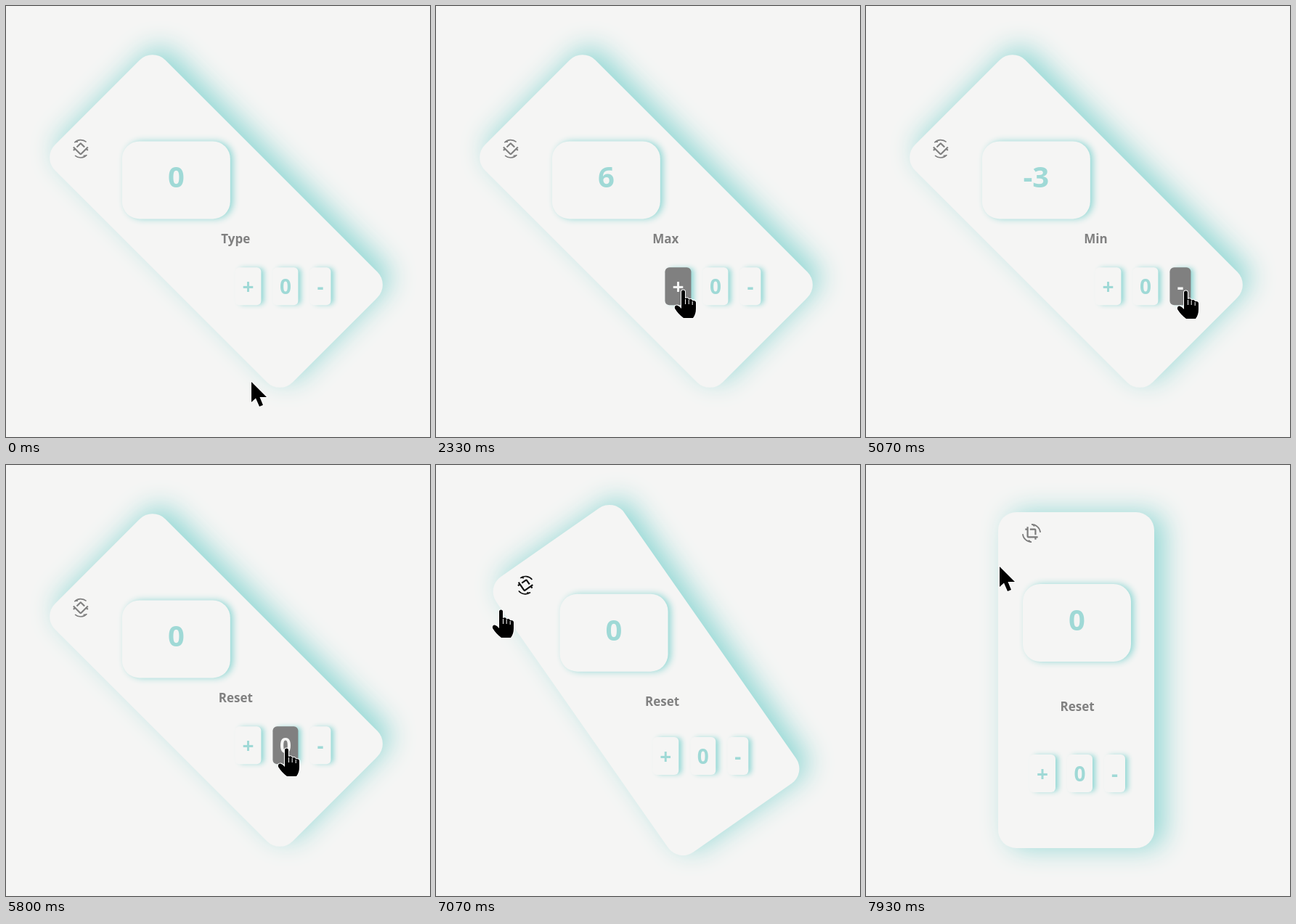
An HTML page for the animation above (8 s loop, 584x594 px).

```html
<!DOCTYPE html>
<html lang="en">
<head>
<meta charset="utf-8">
<title>Rotating counter</title>
<style>
  :root { --bg: #f5f5f4; --teal: #9fd9d6; --shade: #93d8d5; --gray: #808080; }
  html, body { margin: 0; width: 100%; height: 100%; overflow: hidden; background: var(--bg); }
  body { position: relative; font-family: "Noto Sans", "Open Sans", sans-serif; }
  #card {
    position: absolute; left: 182px; top: 65px; width: 215px; height: 463px;
    border-radius: 25px; background: var(--bg); box-shadow: 14px 0 36px var(--shade);
  }
  .item { position: absolute; text-align: center; white-space: pre; }
  #display {
    left: 33.5px; top: 99px; width: 149px; height: 107px; border-radius: 24px;
    font-weight: 900; font-size: 40px; line-height: 97px; color: var(--teal);
    box-shadow: 4px 0 10px var(--shade);
  }
  #label {
    left: 59px; top: 256px; width: 100px; height: 24px;
    font-weight: 900; font-size: 17px; line-height: 24px; color: var(--gray);
  }
  #buttons { left: 43px; top: 334px; width: 132px; height: 52px; }
  #buttons b {
    position: absolute; top: 0; height: 52px; border-radius: 6px;
    font-weight: 700; font-size: 28px; line-height: 52px;
    box-shadow: 5px 0 7px -1px var(--shade);
  }
  #icon { position: absolute; left: 33px; top: 16px; width: 26px; height: 26px; }
  #cursor { position: absolute; left: 0; top: 0; width: 1px; height: 1px; overflow: visible; }
  #cursor .shape { fill: #000; stroke: #fff; stroke-width: 2; paint-order: stroke; stroke-linejoin: round; }
</style>
</head>
<body>
<div id="card">
  <svg id="icon" viewBox="0 0 24 24" fill="none">
    <path stroke="currentColor" stroke-width="2"
      d="M7 4V16a1 1 0 0 0 1 1H20M4 7H7M10 7h6a1 1 0 0 1 1 1v6M17 17v3"/>
    <path stroke="currentColor" stroke-width="1.5"
      d="M23.2 11A11.2 11.2 0 0 0 12 .8M.8 13A11.2 11.2 0 0 0 12 23.2"/>
    <path fill="currentColor" d="M11.4 0l3.8 3.8 1.3-1.3ZM12.6 24l-3.8-3.8-1.3 1.3Z"/>
  </svg>
  <div id="display" class="item">0</div>
  <div id="label" class="item">Type</div>
  <div id="buttons" class="item">
    <b style="left:0;width:36px">+</b><b style="left:52px;width:35px">0</b><b style="left:103px;width:29px">-</b>
  </div>
</div>
<svg id="cursor">
  <path id="arrow" class="shape" d="M0 1V29L6 23.5 11 35 16 33 11.5 22H21Z"/>
  <g id="hand">
    <path class="shape" d="M-2 3Q-2 .5 .5 .5 3 .5 3 3V12Q7.5 10 8 13.5 12.5 12 13 15 18 14.5 18 18V26Q18 34 14 39H1Q-6 34-11 26-12 21.5-8 21.5-5 22-2 26Z"/>
    <path stroke="#fff" d="M3.5 13v7M8.2 14v6M13.2 16v5"/>
  </g>
</svg>
<script>
const LOOP = 8000;
const BG = [245, 245, 244], TEAL = [159, 217, 214], GRAY = [128, 128, 128], INK = [16, 16, 16];
const $ = id => document.getElementById(id);
const items = [...document.querySelectorAll('.item')];
const buttons = [...document.querySelectorAll('#buttons b')];

// Cursor stops: the pointer travels from depart to arrive, then rests there.
const stops = [
  { depart: -1, arrive: 0, x: 338, y: 517 },
  { depart: 200, arrive: 840, x: 340, y: 391, over: '+' },
  { depart: 2670, arrive: 3220, x: 440, y: 392, over: '-' },
  { depart: 5070, arrive: 5480, x: 386, y: 390, over: '0' },
  { depart: 5950, arrive: 6700, x: 89, y: 199, over: 'icon' },
  { depart: 7670, arrive: 7900, x: 184, y: 139 }
];
const PLUS = 920, MINUS = 3320, RESET = 5650, ROTATE = 6903;

const clamp = v => Math.min(1, Math.max(0, v));
const smooth = p => p * p * (3 - 2 * p);
const mix = (a, b, p) => `rgb(${a.map((v, i) => Math.round(v + (b[i] - v) * p))})`;
const clicks = (t, first, gap, max) => Math.min(max, Math.max(0, Math.floor((t - first) / gap) + 1));

// CSS "ease": cubic-bezier(.25, .1, .25, 1)
function ease(x) {
  const curve = (a, b, u) => 3 * a * u * (1 - u) ** 2 + 3 * b * u * u * (1 - u) + u ** 3;
  let low = 0, high = 1;
  for (let i = 0; i < 24; i++) {
    const mid = (low + high) / 2;
    if (curve(.25, .25, mid) < x) low = mid; else high = mid;
  }
  return curve(.1, 1, low);
}

function countAt(t) {
  return t >= RESET ? 0 : clicks(t, PLUS, 280, 6) - clicks(t, MINUS, 200, 9);
}

function labelAt(t) {
  return t >= RESET ? 'Reset' : t >= MINUS ? 'Min' : t >= PLUS ? 'Max' : 'Type';
}

function hoverAt(t, name) {
  const i = stops.findIndex(s => s.over === name);
  const ramp = from => ease(clamp((t - from) / 300));
  return ramp(stops[i].arrive - 40) - ramp(stops[i + 1].depart + 40);
}

function moveCursor(t) {
  const i = stops.findLastIndex(s => s.depart <= t);
  const to = stops[i], from = stops[Math.max(0, i - 1)];
  const p = smooth(clamp((t - to.depart) / (to.arrive - to.depart)));
  const x = from.x + (to.x - from.x) * p, y = from.y + (to.y - from.y) * p;
  const pointing = p < .1 ? from.over : p > .9 && to.over;
  $('cursor').style.transform = `translate(${x}px, ${y}px)`;
  $('hand').style.display = pointing ? '' : 'none';
  $('arrow').style.display = pointing ? 'none' : '';
}

function render(t) {
  const angle = -45 * (1 - ease(clamp((t - ROTATE) / 1000)));
  $('card').style.transform = `rotate(${angle}deg)`;
  items.forEach(el => el.style.transform = `rotate(${-angle}deg)`);

  $('display').textContent = countAt(t);
  $('label').textContent = labelAt(t);
  buttons.forEach(el => {
    const p = hoverAt(t, el.textContent);
    el.style.background = mix(BG, GRAY, p);
    el.style.color = mix(TEAL, BG, p);
  });
  $('icon').style.color = mix(GRAY, INK, hoverAt(t, 'icon'));
  moveCursor(t);
}

const start = performance.now();
function tick() {
  render((performance.now() - start) % LOOP);
  requestAnimationFrame(tick);
}
tick();
</script>
</body>
</html>
```
